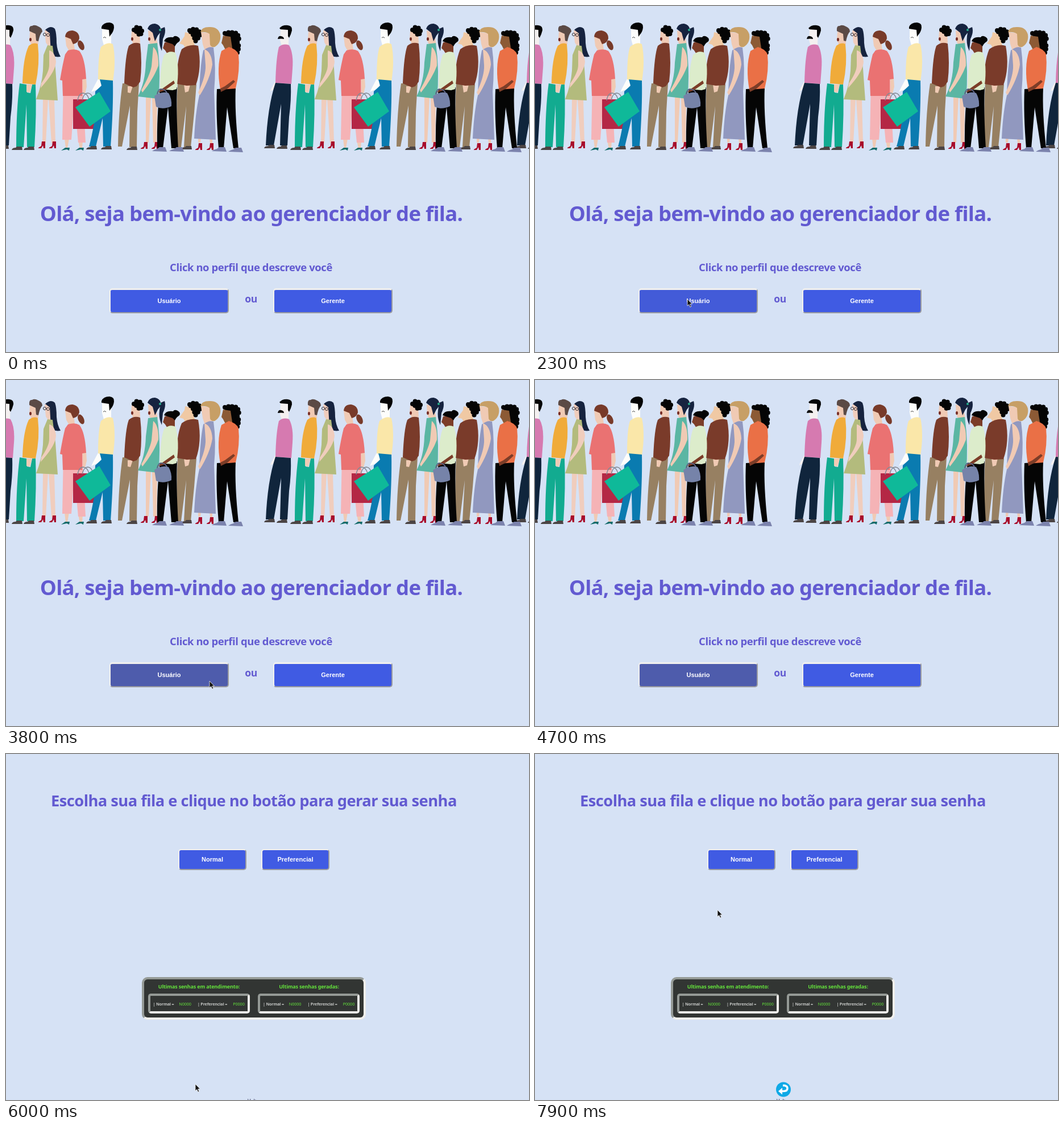
An HTML page that plays this animation: 920 px wide and 608 px high, repeating every 8000 ms.

```html
<!DOCTYPE html>
<html lang="pt">
<head>
<meta charset="utf-8">
<title>Gerenciador de fila</title>
<style>
html, body { margin: 0; width: 100%; height: 100%; overflow: hidden; background: #d6e2f5; }
#stage { position: relative; width: 920px; height: 608px; overflow: hidden; }
.page, .page > svg, #cursor { position: absolute; left: 0; top: 0; }
.page { width: 920px; height: 608px; }
.box { position: absolute; box-sizing: border-box; border: 2px solid; border-radius: 5px; }
.btn { height: 44px; width: 210px; top: 496px; background: #405be3; color: #fff;
  border-top-width: 3px; border-color: #f1f0ee #9b9ca0 #9b9ca0 #f1f0ee;
  font: bold 11px/38px "Liberation Sans", Arial, sans-serif; text-align: center; }
.small { width: 120px; height: 37px; top: 167px; border-top-width: 2px; line-height: 32px; }
.panel { background: #323533; border-width: 4px; border-color: #959a96 #f0efec #f0efec #959a96; }
.outer { left: 239px; top: 392px; width: 394px; height: 75px; border-radius: 10px; }
.inner { top: 421px; width: 179px; height: 35px; }
text { font-family: "Noto Sans", "Open Sans", sans-serif; font-weight: 700; text-anchor: middle; letter-spacing: -.02em; }
.title { fill: #625ad1; }
.green { fill: #64e33c; font-size: 9px; }
.label { font-size: 7.1px; fill: #c4c6c4; }
.code { font-size: 7.3px; font-weight: 400; fill: #64e33c; }
.curl { stroke: #050505; stroke-width: 8; stroke-linecap: round; stroke-dasharray: 0 6.5; fill: #050505; }
</style>
</head>
<body>
<div id="stage">
  <div class="page" id="home">
    <svg width="920" height="608">
      <defs>
        <path id="boot" fill="#a80d2b" d="M0 11l5-3 1-8h6v12h-3l-1-5-3 5H0z"/>
        <path id="shoe" fill="#4b4444" d="M0 6q1-4 7-4l2-2h9l1 6z"/>
        <path id="sneaker" fill="#7c83ad" d="M0 6q4-3 9-4l4-3h10l3 8z"/>
        <g id="man">
          <path fill="#f4f0f0" d="M483 40h15l-1 28-12 2-3-10z"/>
          <path fill="#050505" d="M481 39q5-6 15-5 8 1 7 9-2 8-5 13l-2-3v-11l-13-1zM478 58q1-6 6-5 5 1 5 5-5-1-11 0z"/>
          <path fill="#f4f0f0" d="M474 132l6 4-6 9-9 5 1-4z"/>
          <path fill="#d67ab0" d="M480 72q8-7 18-3 8 14 6 41l-2 27-28-2q1-43 6-63z"/>
          <path fill="#10253c" d="M474 135l27 2q1 28-3 58l-3 50h-13l2-73-13 73h-14q3-68 17-110z"/>
          <use href="#shoe" x="454" y="244"/><use href="#shoe" x="476" y="245"/>
        </g>
        <g id="crowd">
          <use href="#man" x="-490"/>
          <!-- yellow sweater -->
          <path fill="#f0cab4" d="M42 45l14 2 1 20-12 2-4-9z"/>
          <path fill="#5b4a45" d="M41 44q-1-10 5-9 4-3 11 1 7 3 7 9-4 3-7 17l-4-1-1-12z"/>
          <ellipse cx="43" cy="59" rx="2" ry="3" fill="#762d26"/>
          <path fill="#f0ab3a" d="M40 70q9-7 16-3 4 35-4 71l-23-2q1-45 11-66z"/>
          <path fill="#12ab90" d="M24 136l12 2 1 14 6 1 3-15h6q2 50-2 110H37l-1-75-5 75H18q0-65 6-112z"/>
          <path fill="#f0cab4" d="M36 138h10l-4 14-6-1z"/>
          <use href="#shoe" x="10" y="247"/><use href="#shoe" x="31" y="247"/>
          <!-- olive dress -->
          <path fill="#f0cdbd" d="M68 43l12-1 2 28-7 2-5-8zM65 164h9l-4 77h-6zM75 165h10l2 76h-7z"/>
          <path fill="#16233f" d="M69 42q10-9 17-2 3 8 3 25 1 14 7 24-13 2-17-6l-2-35z"/>
          <g fill="none" stroke="#332c32"><circle cx="68" cy="50" r="2.5"/><circle cx="74" cy="51" r="2.5"/></g>
          <path fill="#b3bb7d" d="M73 69l9 1 5 40 4 56-38-2q10-25 12-50l1-28z"/>
          <path fill="#f0cdbd" d="M76 78q10 2 12 20-1 16-21 39l-6 7 1-8q14-20 14-32z"/>
          <use href="#boot" x="57" y="238"/><use href="#boot" x="76" y="238"/>
          <!-- coral blouse -->
          <path fill="#f0cab4" d="M104 53l14 2 3 22-10 2-5-9zM134 126h7l1 16-3 12-4-2zM103 233h8l-3 17h-3zM127 236h8l-1 15h-4z"/>
          <ellipse cx="132" cy="69" rx="5" ry="9" fill="#783a29" transform="rotate(-25 132 69)"/>
          <path fill="#783a29" d="M104 54q1-11 13-11 12 2 12 14-2 8-11 10l-4-9z"/>
          <path fill="#f5b3b6" d="M101 128h34l1 37 4 75h-13l-7-75-5 70H99z"/>
          <path fill="#ea7272" d="M109 78q12-4 20 1 10 12 12 49l-7 1v29h-34l-1-27-4-1q5-30 9-45z"/>
          <path fill="#146c6b" d="M97 254l7-5h8l-1 5-4-2zM122 254l7-5h8l-1 5-4-2z"/>
          <path fill="#b42745" d="M118 164h37v52h-37z"/>
          <path fill="none" stroke="#858a94" stroke-width="1.5" d="M126 166q2-13 10-13 8 1 10 12M134 165q3-12 10-12 7 1 8 9"/>
          <!-- pale shirt -->
          <path fill="#fdfdfb" d="M169 38l16 2v28l-13 1-3-11zM162 128l10 3-8 14-14 6 3-6z"/>
          <path fill="#050505" d="M168 37q3-8 14-8 9 1 8 9-1 8-6 13l-2 3-1-12-13-2z"/>
          <path fill="none" stroke="#444" d="M171 56q2-3 5 0"/>
          <path fill="#fae7a9" d="M167 72q12-10 21-5 6 28 0 66l-26-4q0-42 5-57z"/>
          <path fill="#0a7bb0" d="M165 129l23 2q1 48-4 116h-13l-1-50-12 50h-12q5-18 9-42l2-55 11-10z"/>
          <use href="#shoe" x="141" y="246"/><use href="#shoe" x="167" y="246"/>
          <path fill="#0fb999" d="M122 178l42-27 20 34-37 27z"/>
          <!-- brown sweater -->
          <path fill="#f0cab4" d="M221 44l14 4 1 17-12 2-4-9z"/>
          <path class="curl" d="M225 42l5-5 7 2 3 7-5 6-3-5z" stroke-width="7"/>
          <ellipse cx="222" cy="58" rx="2" ry="3" fill="#762d26"/>
          <path fill="#978062" d="M205 136h29l-3 50-1 62h-13l1-73-14 72h-7q1-63 8-111z"/>
          <path fill="#f0cab4" d="M214 141h9l-4 12-5-1z"/>
          <path fill="#7a3b2a" d="M216 70q9-8 20-4 4 35 0 67l-6 8-6 2-16-7q2-50 8-66z"/>
          <use href="#shoe" x="212" y="247"/>
          <!-- teal dress -->
          <path fill="#f0cab4" d="M250 43l13 4 4 21-11 3-5-10zM246 160h9l-4 80h-5zM257 162h9l-1 78h-6z"/>
          <path fill="#16233f" d="M249 40q3-9 13-9 9 2 10 9l7-3q3 9-3 21l-2 21q-7-14-3-32l-4 5-5 10-4-15z"/>
          <circle cx="271" cy="42" r="2" fill="#28b28f"/>
          <ellipse cx="252" cy="58" rx="2" ry="3" fill="#762d26"/>
          <path fill="#5bb6a3" d="M250 67l16-2q7 50 2 98l-36-4q13-25 14-60z"/>
          <path fill="#f0cab4" d="M259 72q10 8 9 33-8 22-28 47l-2-4q15-26 18-42z"/>
          <use href="#boot" x="237" y="239"/><use href="#boot" x="256" y="239"/>
          <!-- big brown sweater -->
          <path fill="#f0c9a4" d="M315 46l12 3 5 20-16 6-4-7-7-2 9-13z"/>
          <path class="curl" d="M323 43l8-3 8 3 3 7-5 8-4 4-3-10z"/>
          <path fill="#978062" d="M302 135l33 3-4 50-6 60h-12l4-72-9 72h-7q-2-60 1-113z"/>
          <path fill="#f0cab4" d="M313 138h11l-3 12-6 2z"/>
          <path fill="#7a3b2a" d="M309 76q14-10 29-6 7 38-4 69l-16 1-17-3q-2-37 8-61z"/>
          <use href="#shoe" x="308" y="246"/>
          <!-- light shirt and purse -->
          <path fill="#7c3d28" d="M279 64l18-4v24l-12 2-5-8-4-4z"/>
          <path fill="#050505" d="M278 62q3-9 16-7 2-4 8-1 7 4 2 9-4 2-7 8l-4-4z"/>
          <path fill="#050505" d="M271 145l30-2q-2 40 2 107h-12l-6-72-9 72h-10q-1-60 5-105z"/>
          <path fill="#dceccb" d="M278 86q10-9 20-4 8 25 2 64l-7 2-22-2q0-40 7-60z"/>
          <path fill="#7c3d28" d="M295 131l2 5-19 13-10 3 3-4z"/>
          <path fill="none" stroke="#5d6384" stroke-width="2" d="M266 155q2-10 8-9 7 1 9 7"/>
          <path fill="#7683a9" d="M261 158q13-9 25-5 6 10 5 23-15 7-27 1z"/>
          <use href="#sneaker" x="257" y="249"/><use href="#sneaker" x="287" y="249"/>
          <!-- lavender dress -->
          <path fill="#f0cab4" d="M343 46l17 2 4 24-15 4-3-9zM338 232h5l-1 8h-4zM358 233h5v8h-4z"/>
          <path fill="#c79f66" d="M342 46q2-9 15-9 16-1 20 13 2 15-10 22-6 1-8-4l-1-19q-6-4-16-3z"/>
          <path fill="#9198bf" d="M347 78q10-8 18-5 5 35 1 77l3 85-38-2q2-45 9-76 1-50 7-79z"/>
          <path fill="#f0cab4" d="M349 76q13 5 14 27-4 25-22 54l-3-5q14-30 13-48z"/>
          <use href="#boot" x="333" y="241"/><use href="#boot" x="353" y="241"/>
          <!-- orange shirt -->
          <path class="curl" d="M385 48l9-2 13 2 3 9-3 6 3 9-3 10-6-4-3-20z"/>
          <path fill="#8c5a35" d="M382 52l13 2 3 20-12 3-4-8-3-4z"/>
          <path fill="#050505" d="M371 146l33-2q-2 40 5 106h-9l-11-72-6 72h-9q-5-60-3-104z"/>
          <path fill="#ea7046" d="M379 79l13-7q14 4 17 13 3 28-5 60l-27 2q-7-40 2-68z"/>
          <path fill="#7c3d28" d="M400 130l3 3-13 12-12 6-1-6 8-4z"/>
          <use href="#sneaker" x="362" y="249"/><use href="#sneaker" x="391" y="250"/>
        </g>
      </defs>
      <use href="#man" x="442"/>
      <use href="#crowd"/><use href="#crowd" x="490"/>
      <text class="title" x="431.5" y="378" font-size="36.5">Olá, seja bem-vindo ao gerenciador de fila.</text>
      <text class="title" x="431" y="466" font-size="18.4">Click no perfil que descreve você</text>
      <text class="title" x="431" y="521" font-size="17.5">ou</text>
    </svg>
    <div class="box btn" id="user" style="left:182px">Usuário</div>
    <div class="box btn" style="left:470px">Gerente</div>
  </div>

  <div class="page" id="queue">
    <div class="box btn small" style="left:303px">Normal</div>
    <div class="box btn small" style="left:449px">Preferencial</div>
    <div class="box panel outer"></div>
    <div class="box panel inner" style="left:250px"></div>
    <div class="box panel inner" style="left:443px"></div>
    <svg width="920" height="608">
      <defs>
        <g id="row">
          <text class="label" x="277" y="441.5">| Normal =</text>
          <text class="code" x="315" y="441.5">N0000</text>
          <text class="label" x="363" y="441.5">| Preferencial =</text>
          <text class="code" x="409.5" y="441.5">P0000</text>
        </g>
      </defs>
      <text class="title" x="436" y="92" font-size="27.3">Escolha sua fila e clique no botão para gerar sua senha</text>
      <text class="green" x="339.5" y="412">Ultimas senhas em atendimento:</text>
      <text class="green" x="533" y="412">Ultimas senhas geradas:</text>
      <use href="#row"/><use href="#row" x="193.5"/>
      <g id="back">
        <circle cx="437" cy="589.5" r="13" fill="#0fa9e6"/>
        <path fill="none" stroke="#fff" stroke-width="3.5" d="M436 582.5h3q5 1 5 5 0 5-7 5h-3"/>
        <path fill="#fff" d="M428 592.5l7-6v12z"/>
      </g>
      <text x="437" y="613" font-size="9" style="font-weight:400" fill="#35355c">Voltar</text>
    </svg>
  </div>

  <svg id="cursor" width="12" height="17" viewBox="-1 -1 12 17">
    <path fill="#111" stroke="#f4f4f4" stroke-width=".8" d="M0 0v12l2.8-2.5L4.8 14l2-.9-2-4.3H8.5z"/>
  </svg>
</div>
<script>
const LOOP = 8000, STEP = 100;
// time, x, y
const enter = [[1500, 905, 353], [2000, 392, 432], [2100, 392, 432], [2300, 268, 515],
  [2400, 285, 521], [2500, 315, 522], [2700, 385, 511], [3000, 462, 496], [3100, 455, 488],
  [3200, 430, 485], [3400, 360, 508], [3600, 325, 522], [3900, 374, 532], [4000, 277, 516],
  [4100, 277, 516], [4200, 367, 528], [4300, 367, 528], [4400, 345, 565], [4500, 309, 604], [4600, 309, 604]];
const leave = [[5800, 338, 596], [5900, 336, 586], [6000, 333, 580], [6100, 333, 580],
  [6300, 330, 575], [6500, 330, 575], [7400, 360, 528], [7500, 360, 528], [7600, 369, 505],
  [7700, 360, 430], [7800, 338, 340], [7900, 321, 274]];
// time, hover amount
const hover = [[2200, 0], [2300, .2], [2600, 1], [2700, 1], [2900, 0], [3300, 0], [3700, 1]];
const base = [64, 91, 227], dark = [78, 92, 172];
const $ = id => document.getElementById(id);
const mix = (a, b, k) => a.map((v, i) => v + (b[i] - v) * k);

function at(keys, t) {
  if (t <= keys[0][0]) return keys[0].slice(1);
  const i = keys.findIndex(k => k[0] > t);
  if (i < 0) return keys[keys.length - 1].slice(1);
  const a = keys[i - 1], b = keys[i];
  return mix(a, b, (t - a[0]) / (b[0] - a[0])).slice(1);
}

function show(el, on) { el.style.display = on ? "" : "none"; }

function draw() {
  const t = Math.floor(performance.now() % LOOP / STEP) * STEP;
  show($("home"), t < 6000);
  show($("queue"), t >= 6000);
  show($("back"), t >= 6200);
  $("user").style.backgroundColor = `rgb(${mix(base, dark, at(hover, t)[0]).map(Math.round)})`;
  show($("cursor"), t >= 1500 && t < 4700 || t >= 5800);
  const [x, y] = at(t < 5000 ? enter : leave, t);
  $("cursor").style.transform = `translate(${Math.round(x) - 1}px, ${Math.round(y) - 1}px)`;
  requestAnimationFrame(draw);
}
draw();
</script>
</body>
</html>
```
